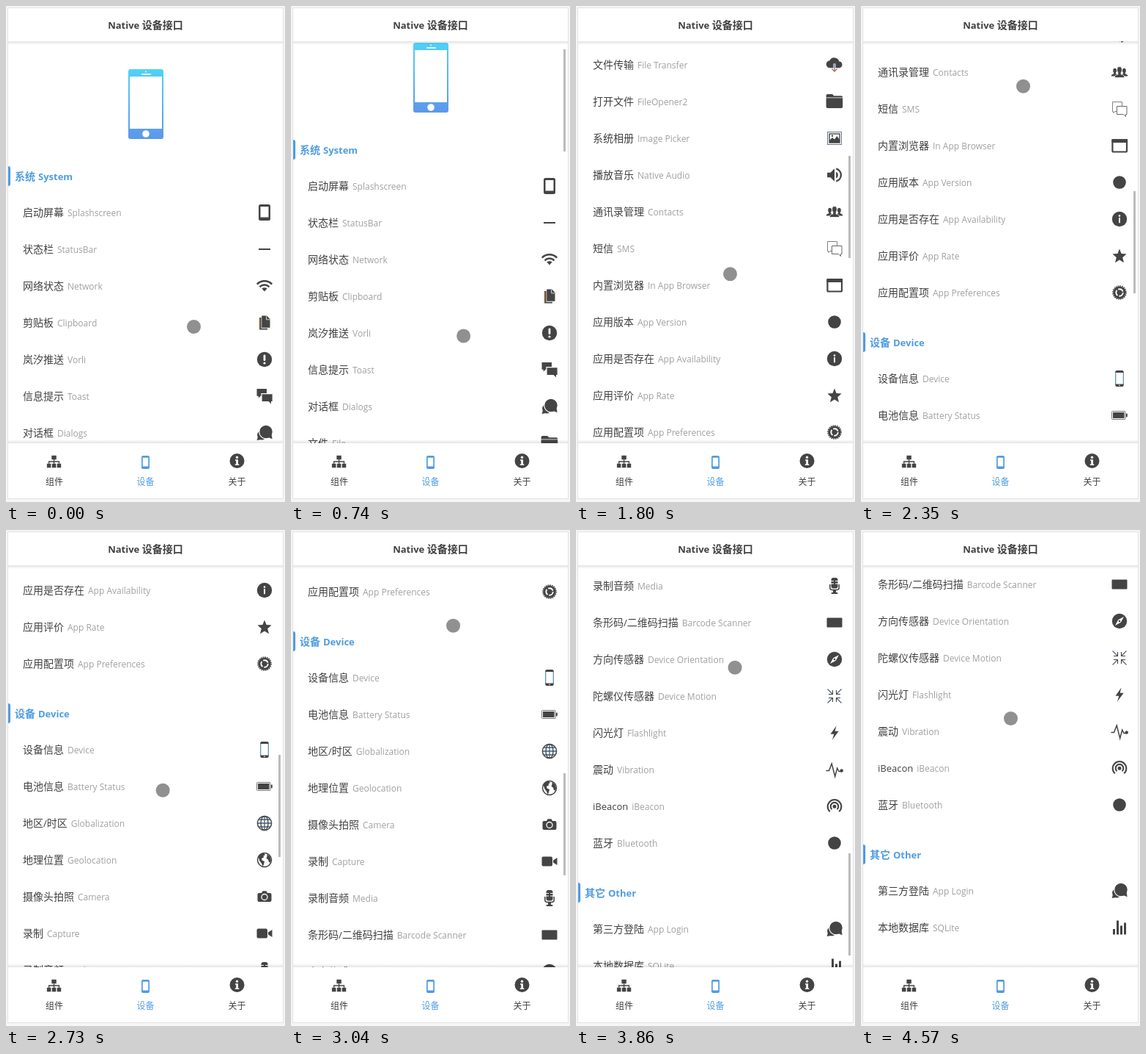
Recreate the animation shown at these times as an HTML page. Size 381 px wide and 675 px high, loop 5.14 s.

```html
<!DOCTYPE html>
<html lang="zh-CN">
<head>
<meta charset="utf-8">
<title>Native 设备接口</title>
<style>
  html, body { margin: 0; width: 100%; height: 100%; overflow: hidden; background: #f6f6f6; }
  svg { display: block; }
  text { font: 14px "Open Sans", "Noto Sans CJK SC", "Noto Sans CJK", sans-serif; fill: #404040; white-space: pre; }
  .b { font-weight: 700; }
  .latin { font-size: 13px; }
  .sub { font-size: 12px; fill: #a0a0a0; }
  .blue { fill: #4f9ce0; }
  .tab { font-size: 12px; }
  .ico { fill: #444; }
  .s { fill: none; stroke: #444; }
  .w { fill: #fff; }
</style>
</head>
<body>
<svg id="stage" width="381" height="675" viewBox="0 0 381 675">
  <defs>
    <clipPath id="view"><rect x="3" y="48" width="375" height="547"/></clipPath>
    <linearGradient id="body" x2="0" y2="1">
      <stop offset="0" stop-color="#4fd2f7"/><stop offset="1" stop-color="#5d98ea"/>
    </linearGradient>
    <linearGradient id="down" x2="0" y2="1">
      <stop offset="0" stop-opacity=".11"/><stop offset="1" stop-opacity="0"/>
    </linearGradient>
    <linearGradient id="up" x2="0" y2="1">
      <stop offset="0" stop-opacity="0"/><stop offset="1" stop-opacity=".11"/>
    </linearGradient>
  </defs>
  <rect x="2.5" y="2.5" width="376" height="668" fill="#fff" stroke="#e2e2e2"/>
  <g clip-path="url(#view)">
    <g id="list">
      <rect x="167" y="86" width="48" height="95" rx="3" fill="url(#body)"/>
      <rect class="w" x="169" y="96" width="44" height="71"/>
      <rect class="w" x="185" y="92" width="13" height="1.8" rx=".9"/>
      <circle class="w" cx="191" cy="89.3" r=".9"/>
      <circle class="w" cx="191" cy="174" r="4.8"/>
    </g>
  </g>
  <rect x="3" y="48" width="375" height="5" fill="url(#down)"/>
  <rect x="3" y="590" width="375" height="5" fill="url(#up)"/>
  <rect id="bar" x="372" width="3" height="139" fill="#bbb"/>
  <g id="tabs"></g>
  <circle id="dot" r="9.5" fill="#919091"/>
</svg>
<script>
const $ = id => document.getElementById(id);
const box = (x, y, w, h, rest = '') => `<rect x="${x}" y="${y}" width="${w}" height="${h}" ${rest}/>`;
const disc = (x, y, r, rest = '') => `<circle cx="${x}" cy="${y}" r="${r}" ${rest}/>`;
const oval = (x, y, rx, ry, rest = '') => `<ellipse cx="${x}" cy="${y}" rx="${rx}" ry="${ry}" ${rest}/>`;
const shape = (d, rest = '') => `<path d="${d}" ${rest}/>`;
const line = (d, width = 2, color = '#444') => `<path d="${d}" class="s" style="stroke:${color};stroke-width:${width}"/>`;
const W = 'class="w"';
const ring = width => `class="s" stroke-width="${width}"`;

const folder = shape('M.6 4q0-2 2-2h6.600l2 2.200h10q2 0 2 2.200H.6zM.6 7.200h22.600V19q0 2-2 2H2.600q-2 0-2-2z');
const chats = disc(8.5, 15, 6.4) + shape('M3 17L1.6 22l6-1z') +
  disc(14, 10.5, 9.3, 'stroke="#fff" stroke-width="1.2"') + shape('M17 18l5.6 2.2-1-6z');
const person = (x, y, k) => `<g transform="translate(${x} ${y}) scale(${k})">` +
  oval(0, -4, 3.2, 4.2) + shape('M-1.8-1h3.6v2.600q4.700.9 4.700 4.400H-6.5q0-3.500 4.700-4.400z') + '</g>';

const icons = {
  phone: box(4, 1, 16, 22, 'rx="2.5"') + box(6.5, 4, 11, 14.5, W),
  minus: box(4, 11, 16, 2),
  wifi: line('M1.8 9.6a14.3 14.3 0 0 1 20.4 0M5.5 13.3a9.2 9.2 0 0 1 13 0', 2.5) + shape('M8.4 15.6a5.3 5.3 0 0 1 7.2 0L12 19.5z'),
  copy: shape('M5 5h2.5v14.7H16v1.8H5z') + box(4.6, 5.5, 1, 15.5, 'fill="#d98a3c"') +
    shape('M8.2 2.5h7l4.3 4.6v11.6H8.2z') + line('M14.6 3v4.8h4.6', .8, '#fff'),
  alert: disc(12, 12, 10.2) + box(10.6, 5.5, 2.8, 8.6, 'rx="1.3" class="w"') + disc(12, 17, 1.6, W),
  toast: shape('M1.5 2H15v9.7H6.7l-3 2.8v-2.8H1.5z') +
    shape('M8 8.6h15.2v11h-1.6v4l-4.4-4H8z', 'stroke="#fff" stroke-width="1.2"'),
  chats, folder,
  info: disc(12, 12, 10.2) + disc(12, 7.6, 1.3, W) + box(11, 10, 2, 7.2, W),
  about: disc(12, 12, 10) + disc(12, 7.3, 1.7, W) + shape('M9.5 10.2h4v6.3h1.3V18H9.3v-1.5h1.4v-4.8H9.5z', W),
  plain: disc(12, 12, 8.8),
  cloud: shape('M6 16.2a5 5 0 0 1-.6-10 7 7 0 0 1 13 1.3 4.4 4.4 0 0 1 .6 8.7z') +
    line('M12 10.5v6', 3, '#fff') + line('M12 11v10', 1.3, '#4b7fc0') + line('M8.5 17.5l3.5 3.7 3.5-3.7', 1.2, '#b9672c'),
  image: box(2.5, 3.5, 19, 17, 'fill="#fff" stroke="#6a7694"') + box(5, 6, 14, 12, ring(1.4)) +
    shape('M5 18v-3l4-4 3 2.6 3.4-4.600L19 14v4z') + disc(9, 8.8, 1.2),
  volume: '<g transform="translate(-1.2 -1.2) scale(1.1)">' + shape('M3 9v6h4l5 5V4L7 9zM16.5 12A4.5 4.5 0 0 0 14 8v8a4.500 4.500 0 0 0 2.500-4z') +
    shape('M14 3.200v2.100a7 7 0 0 1 0 13.400v2.100a9 9 0 0 0 0-17.600z') + '</g>',
  people: person(5.6, 13, .75) + person(18.4, 13, .75) +
    `<g stroke="#fff" stroke-width=".7">${person(12, 13.200, 1.050)}</g>` + box(10.400, 11, 3.200, 4),
  sms: line('M8 15.5H6l-2.5 2v-2h-1v-13h13V8', 1, '#85807a') + line('M8.5 8.5H22v11h-1.5v3l-3-3h-9z', 1, '#6b6870'),
  window: box(2.4, 4, 19.6, 16.5, `rx="1.5" ${ring(2.2)}`) + box(1.3, 3, 21.800, 5, 'rx="1"'),
  star: shape('M12 2.500l2.600 6.600 7 .5-5.400 4.600 1.800 7L12 17.400l-6 3.800 1.800-7-5.400-4.600 7-.5z'),
  gear: disc(12, 12, 8.600) + disc(12, 12, 9, ring(1.6) + ' stroke-dasharray="1.700 1.130"') +
    disc(12, 12, 4.700, 'fill="none" stroke="#fff" stroke-width="1.900" stroke-dasharray="7.900 1.940"'),
  slim: box(6.2, 1, 11.6, 22, 'rx="2.3"') + box(7.2, 4, 9.6, 15.5, W) +
    line('M6.5 4v15.5M17.5 4v15.5', 1, '#4e9bd6') + disc(12, 21.2, .8, W),
  battery: box(1.5, 6.5, 18.5, 11, `rx="1" ${ring(1)} style="stroke:#777"`) + box(3, 8, 15.5, 8) + box(20.8, 9.5, 2, 5, 'rx="1"'),
  globe: disc(12, 12, 9.6, ring(1.5)) + line('M12 2.5v19M2.5 12h19M4 7h16M4 17h16', 1.3, '#3f5f78') + oval(12, 12, 5, 9.5, ring(1.3)),
  earth: disc(12, 12, 9.5, ring(1.5)) + shape('M3.5 8Q6 3 11 2.7l2 2.3-2.5 1.5.5 2-3 1.5.5 2.5 3.5 1.5-1 4-1.5 3-1.5-4.5-2.5-3z') +
    shape('M15.5 4l4 3 1.5 5-1 3.5-2-.5-1-3.5-2.5-1.5 1-3z'),
  camera: shape('M4.5 7H8l1.5-2.7h5L16 7h3.5q2 0 2 2v8q0 2-2 2h-15q-2 0-2-2V9q0-2 2-2z') +
    disc(12, 12.5, 4, 'fill="none" stroke="#fff" stroke-width="1.3"'),
  video: box(1.5, 5.5, 14.5, 13, 'rx="2"') + shape('M17 10.5L22.5 7v10L17 13.5z'),
  mic: box(7.5, 1, 9, 14.5, 'rx="3"') + line('M7 5.5h4M13 5.5h4M7 9h4M13 9h4', 1, '#fff') +
    line('M5.8 10v4.5q0 3 3.2 3h6q3.2 0 3.2-3V10', 1.5) + box(10, 17, 4, 4) + box(7.5, 21, 9, 2, 'rx="1"'),
  block: box(1.5, 5.5, 21, 13, 'rx="1"'),
  compass: disc(12, 12, 10.2) + shape('M18 6l-4.2 7.8L6 18l4.2-7.8z', W) + disc(12, 12, 1.3),
  shrink: line('M2.5 2.5l7 7M21.5 2.5l-7 7M2.5 21.5l7-7M21.5 21.5l-7-7', 1.1, '#4e5a70') +
    line('M9.5 4v5.5H4M14.5 4v5.5H20M9.5 20v-5.5H4M14.5 20v-5.5H20', 1.1),
  flash: shape('M14.5 2.5l-8 11.2h4.8L9 21.5l8.700-11.700h-5z'),
  pulse: line('M.5 13.5h4L8.2 4l4.5 17.5 3-11.5 2.3 4.5h4', 1.5) + disc(21.7, 13.5, 2.2),
  beacon: line('M5.8 19.3a9.3 9.3 0 1 1 12.4 0M8.5 16.2a5.3 5.3 0 1 1 7 0', 2.1) + disc(12, 12.3, 2.5),
  chart: box(3, 14, 3, 7.5) + box(8, 2.5, 3, 19) + box(13, 9.5, 3, 12) + box(18, 5.5, 3, 16),
  tree: box(8.5, 3, 7, 6) + box(1.5, 15, 6, 6) + box(9, 15, 6, 6) + box(16.5, 15, 6, 6) + line('M12 9v6M4.5 15v-3h15v3', 1.5)
};

const groups = [
  ['系统|System', 232, `启动屏幕|Splashscreen|phone
状态栏|StatusBar|minus
网络状态|Network|wifi
剪贴板|Clipboard|copy
岚汐推送|Vorli|alert
信息提示|Toast|toast
对话框|Dialogs|chats
文件|File|folder
文件传输|File Transfer|cloud
打开文件|FileOpener2|folder
系统相册|Image Picker|image
播放音乐|Native Audio|volume
通讯录管理|Contacts|people
短信|SMS|sms
内置浏览器|In App Browser|window
应用版本|App Version|plain
应用是否存在|App Availability|info
应用评价|App Rate|star
应用配置项|App Preferences|gear`],
  ['设备|Device', 1249, `设备信息|Device|slim
电池信息|Battery Status|battery
地区/时区|Globalization|globe
地理位置|Geolocation|earth
摄像头拍照|Camera|camera
录制|Capture|video
录制音频|Media|mic
条形码/二维码扫描|Barcode Scanner|block
方向传感器|Device Orientation|compass
陀螺仪传感器|Device Motion|shrink
闪光灯|Flashlight|flash
震动|Vibration|pulse
iBeacon|iBeacon|beacon
蓝牙|Bluetooth|plain`],
  ['其它|Other', 2016, `第三方登陆|App Login|chats
本地数据库|SQLite|chart`]
];

// Latin runs are set one size below the Chinese text
const mixed = s => s.replace(/[\x21-\x7e]+/g, m => `<tspan class="latin">${m}</tspan>`);
const icon = (name, x, y, extra = '') => `<g class="ico" transform="translate(${x - 12} ${y - 12})${extra}">${icons[name]}</g>`;

let html = '';
for (const [head, y, rows] of groups) {
  const [zh, en] = head.split('|');
  html += shape(`M3 ${y - 14}q3 0 3 3v21q0 3-3 3z`, 'class="blue"') +
    `<text class="b blue" x="12" y="${y + 5}">${zh}<tspan class="latin" dx="4">${en}</tspan></text>`;
  rows.split('\n').forEach((row, i) => {
    const [name, sub, ico] = row.split('|'), cy = y + 49 + i * 50;
    html += `<text x="23" y="${cy + 5}">${mixed(name)}<tspan class="sub" dx="5">${sub}</tspan></text>` + icon(ico, 353, cy);
  });
}
$('list').insertAdjacentHTML('beforeend', html);

const label = (s, x, cls = '') => `<text class="tab ${cls}" x="${x}" y="652" text-anchor="middle">${s}</text>`;
$('tabs').innerHTML =
  `<text class="b" x="190.5" y="31" text-anchor="middle">${mixed('Native 设备接口')}</text>` +
  icon('tree', 65.5, 620, ' translate(1 1) scale(.92)') + label('组件', 66) +
  box(185, 612, 11, 18, 'rx="2" class="blue"') + box(186.7, 614.7, 7.6, 11.8, W) + label('设备', 190.5, 'blue') +
  icon('about', 315.5, 619) + label('关于', 315.5);

// Monotone cubic through [time, value...] keys
function track(keys, t, k = 1) {
  const n = keys.length - 1;
  if (t <= keys[0][0]) return keys[0][k];
  if (t >= keys[n][0]) return keys[n][k];
  let i = 0;
  while (keys[i + 1][0] <= t) i++;
  const slope = j => (keys[j + 1][k] - keys[j][k]) / (keys[j + 1][0] - keys[j][0]);
  const tangent = j => {
    if (j === 0 || j === n) return 0;
    const a = slope(j - 1), b = slope(j);
    return a * b <= 0 ? 0 : 2 * a * b / (a + b);
  };
  const h = keys[i + 1][0] - keys[i][0], u = (t - keys[i][0]) / h, v = 1 - u;
  return v * v * (1 + 2 * u) * keys[i][k] + u * u * (3 - 2 * u) * keys[i + 1][k] +
    h * u * v * (v * tangent(i) - u * tangent(i + 1));
}

const LOOP = 5140;
const scroll = [[590, 0], [1160, 311], [1480, 520], [1800, 601], [1930, 610], [2350, 790], [2620, 970],
  [2800, 1015], [3040, 1097], [3250, 1235], [3480, 1328], [3700, 1430], [3990, 1566], [4250, 1574]];
const pointer = [[0, 256.5, 436.5], [550, 235.5, 505.5], [620, 235.5, 500], [1160, 236.5, 147.5],
  [1260, 234, 135], [1800, 210.5, 364.5], [1900, 210, 375], [2350, 221.5, 109.5], [2430, 222, 100],
  [2760, 214, 360], [3040, 221.5, 130.5], [3100, 222, 120], [3480, 228.5, 394.5],
  [3540, 228, 400], [3900, 216, 180], [4250, 210, 300], [4500, 206.5, 265.5], [4570, 204.5, 256.5]];
const clamp = x => Math.max(0, Math.min(1, x));

const start = performance.now();
function draw() {
  const t = (performance.now() - start) % LOOP;
  const y = track(scroll, t);
  $('list').setAttribute('transform', `translate(0 ${-Math.round(y)})`);
  $('bar').setAttribute('y', Math.round(50 + y * .256));
  $('bar').setAttribute('opacity', t < 600 ? 0 : clamp((4480 - t) / 200));
  $('dot').setAttribute('cx', track(pointer, t, 1));
  $('dot').setAttribute('cy', track(pointer, t, 2));
  requestAnimationFrame(draw);
}
draw();
</script>
</body>
</html>
```
